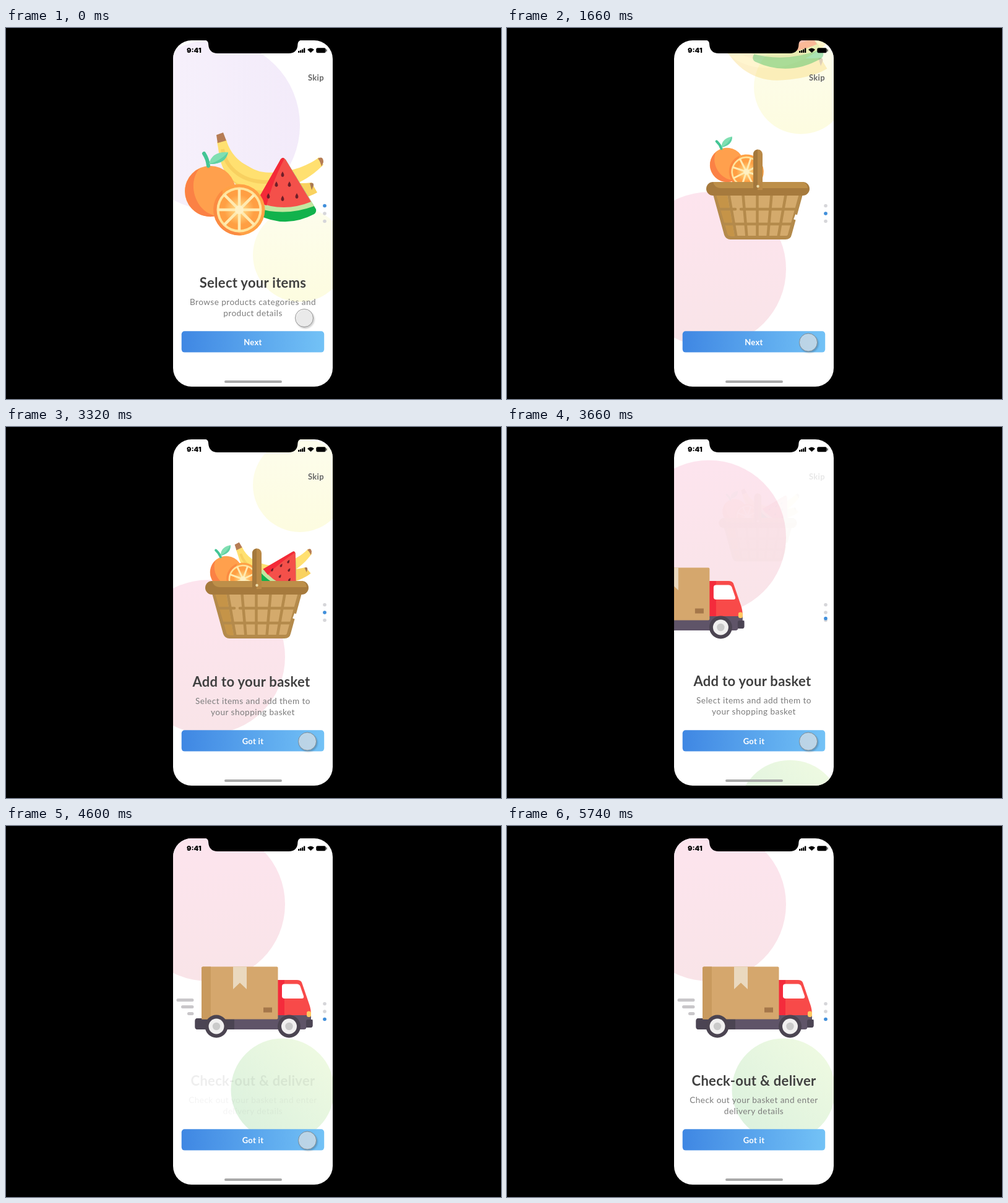
These frames come from a looping animation (800x600 px, 6.1 s). An HTML page:

```html
<!DOCTYPE html>
<html lang="en">
<head>
<meta charset="utf-8">
<title>Onboarding</title>
<style>
  html, body { margin: 0; width: 100%; height: 100%; overflow: hidden; background: #000; }
  svg { display: block; width: 800px; height: 600px; font-family: Lato, "Open Sans", sans-serif; }
  .copy { text-anchor: middle; }
  .title { font-weight: 700; font-size: 22px; letter-spacing: .3px; fill: #404040; }
  .sub { font-size: 13.6px; letter-spacing: .45px; fill: #7c7c7c; }
  .label { font-weight: 700; font-size: 13px; letter-spacing: .3px; }
  .time { font: 900 11px Inter, sans-serif; }
</style>
</head>
<body>
<svg viewBox="0 0 800 600">
  <defs>
    <clipPath id="screen"><rect x="270" y="20" width="258" height="560" rx="30"/></clipPath>
    <linearGradient id="blue"><stop stop-color="#3f87e3"/><stop offset="1" stop-color="#73c2f6"/></linearGradient>
    <linearGradient id="violet"><stop stop-color="#f7f2fc"/><stop offset="1" stop-color="#f3ebfa"/></linearGradient>
    <linearGradient id="lemon" x2="0" y2="1"><stop stop-color="#fdfdec"/><stop offset="1" stop-color="#fdfce0"/></linearGradient>
    <linearGradient id="rose" x2="0" y2="1"><stop stop-color="#fde4ee"/><stop offset="1" stop-color="#f9e4e8"/></linearGradient>
    <linearGradient id="mint" y1="1" y2="0"><stop stop-color="#d9f0dd"/><stop offset="1" stop-color="#f1fbe2"/></linearGradient>
    <radialGradient id="pulp"><stop offset=".1" stop-color="#ffdc86"/><stop offset=".75" stop-color="#ff9f43"/></radialGradient>
    <filter id="shade" x="-30%" y="-30%" width="170%" height="170%">
      <feDropShadow dx="1.5" dy="2" stdDeviation="1.2" flood-opacity=".3"/>
    </filter>
  </defs>

  <g clip-path="url(#screen)">
    <rect x="270" y="20" width="258" height="560" fill="#fff"/>
    <circle id="c1" r="138" fill="url(#violet)"/>
    <circle id="c2" r="76" fill="url(#lemon)"/>
    <circle id="c3" r="124.5" fill="url(#rose)"/>
    <circle id="c4" r="83.5" fill="url(#mint)"/>

    <g id="cart">
      <g id="banana">
        <path fill="#f9d25f" d="M350 200C352 245 390 285 440 281Q480 279 503 266L494 250Q460 254 420 240Z"/>
        <path fill="#a97a52" d="M491 251Q498 249 497 255L494 262Z"/>
        <path fill="#ffe070" d="M341 184C346 206 343 230 372 250C412 276 474 262 513 221L506 209C480 229 440 238 410 232C380 222 363 205 356 181Z"/>
        <path fill="none" stroke="#f8d060" stroke-width="6" d="M350 196C356 230 385 249 420 249Q445 249 470 242"/>
        <path fill="#b67d55" d="M340 173L351 169L356 182L342 186ZM504 211Q513 206 513 217L510 224Q508 216 504 211Z"/>
      </g>
      <g id="orange">
        <circle cx="330" cy="264" r="41" fill="#ffa04d"/>
        <path fill="#fb8145" d="M313 227A41 41 0 0 0 340 304C305 298 292 250 313 227Z"/>
        <path fill="none" stroke="#43c595" stroke-width="6" stroke-linecap="round" d="M320 203Q326 212 327 223"/>
        <path fill="#80dfb2" d="M328 220Q333 199 359 201Q355 221 328 220Z"/>
        <path fill="#5fd0a2" d="M328 220Q345 216 359 201Q355 221 328 220Z"/>
      </g>
      <g id="melon">
        <path fill="#12b24c" d="M443 214Q447 207 452 213L501 293Q502 298 498 301Q452 325 407 302Q402 299 404 294Z"/>
        <path fill="#c4e6a0" d="M443 214Q447 207 452 213L498 288Q450 306 401 290Z"/>
        <path fill="#f4504a" d="M443 214Q447 207 452 213L493 281Q449 299 405 281Z"/>
        <path fill="#f42a38" d="M443 214Q446 208 450 211Q430 250 421 287L405 281Z"/>
        <g id="seeds" fill="#6e1f28"></g>
      </g>
      <g id="half">
        <circle cx="377" cy="294" r="41.5" fill="#ffa145"/>
        <path fill="#fb8b42" d="M350 262A41.5 41.5 0 0 0 382 335Q345 318 350 262Z"/>
        <circle cx="377" cy="294" r="36.5" fill="#ffe39a"/>
        <circle cx="377" cy="294" r="32.5" fill="url(#pulp)"/>
        <path id="spokes" stroke="#ffeab0" stroke-width="4.5"/>
        <circle cx="377" cy="294" r="7" fill="#fff0c2"/>
      </g>
      <g id="basket">
        <path fill="#d4aa6c" stroke="#b48a4b" stroke-width="6" stroke-linejoin="round" d="M335 265H476L457 334Q456 339 450 339H361Q356 339 354 334Z"/>
        <path fill="#c59448" d="M338 270H356L368 337H362Q357 336 356 332Z"/>
        <path id="weave" fill="none" stroke="#b48a4b" stroke-width="4.5" stroke-linecap="round"/>
        <path stroke="#fff" stroke-width="4" d="M468 302L465 310"/>
        <rect x="322" y="249" width="167" height="22" rx="11" fill="#a67a3d"/>
        <path fill="#bd8f49" d="M333 249H478A11 11 0 0 1 486 259H345Q335 258 333 249Z"/>
        <path fill="#b98946" d="M398 262V204A7.5 7.5 0 0 1 413 204V262Z"/>
        <path fill="#a3783d" d="M398 262V204A7.5 7.5 0 0 1 405 196.500V262Z"/>
        <circle cx="405.500" cy="256" r="2.200" fill="#ecdca8"/>
      </g>
    </g>

    <path id="speed" stroke="#c9c7ca" stroke-width="5" stroke-linecap="round" d="M278 281.500H301M285.500 292.500H301M295.500 303.500H301"/>
    <g id="truck">
      <rect x="305.500" y="311" width="180" height="18" rx="4" fill="#5f5468"/>
      <path fill="#4b4453" d="M310 311H369V329H310Q305.500 329 305.500 325V315Q305.500 311 310 311Z"/>
      <path fill="#5f5468" d="M439 305H493V313H495.500V323Q495 326 491 326H439Z"/>
      <rect x="485" y="313" width="10.500" height="13" rx="3" fill="#4b4453"/>
      <path fill="#f84a49" d="M439 249H470Q476 249 478 253L490 288Q493 296 493 306H439Z"/>
      <path fill="#f42b3c" d="M439 249H450V306H439Z"/>
      <path fill="#fff" d="M450 255.500H470Q474 255.500 475.500 259L481 275Q482 279 478 279H450Q446 279 446 275V259.500Q446 255.500 450 255.500Z"/>
      <rect x="486" y="299.500" width="7" height="9.500" rx="3" fill="#ffca62"/>
      <rect x="316" y="227.500" width="123.500" height="85" rx="2" fill="#d5a76d"/>
      <path fill="#c99a5e" d="M318 227.500H331V312.500H316V229.500Z"/>
      <path fill="#ead9bf" d="M367 227.500H389V264L378 253.500L367 264Z"/>
      <rect x="416" y="293.500" width="14" height="8" fill="#a5774a"/>
      <g id="wheels"></g>
    </g>

    <g id="dots" fill="#d6d6da"></g>
    <circle id="dot" cx="515" r="2.800" fill="#3f8fdc"/>
    <g id="copies"></g>

    <rect x="283.700" y="490.200" width="230.500" height="34.400" rx="5" fill="url(#blue)"/>
    <g class="copy label" fill="#fff">
      <text id="next" x="399" y="512.500">Next</text>
      <text id="got" x="399" y="512.500">Got it</text>
    </g>
    <text id="skip" class="label" x="488" y="85" fill="#666">Skip</text>

    <text class="time" x="292" y="40">9:41</text>
    <path d="M472 37h2.300v3h-2.300zM475 36h2.300v4h-2.300zM478 34.500h2.300v5.500h-2.300zM481 32.500h2.300v7.500h-2.300z"/>
    <path d="M487 35Q492.500 30 498 35L492.500 40Z"/>
    <rect x="501.500" y="32.500" width="15" height="7.500" rx="2" stroke="#000" stroke-opacity=".5"/>
    <path d="M517.500 34.500h1v3.500h-1z"/>
    <rect x="353" y="570" width="93" height="4" rx="2" fill="#a9a9a9"/>
    <circle id="cursor" r="14.500" fill="#ececec" fill-opacity=".61" stroke="#777" stroke-opacity=".75" filter="url(#shade)"/>
    <path d="M321 19.500Q327 20 327 26Q328 41 342 41H457Q471 41 471.500 26Q472 20 478 19.500Z"/>
  </g>
</svg>

<script>
const LOOP = 6100;
const $ = id => document.getElementById(id);
const mix = (a, b, p) => a + (b - a) * p;
const span = (t, a, b) => Math.min(1, Math.max(0, (t - a) / (b - a)));
const sine = u => (1 - Math.cos(Math.PI * u)) / 2;
const swing = (t, a, b) => sine(span(t, a, b));

// cubic-bezier(.25, .1, .25, 1)
const curve = (m, p, q) => 3 * (1 - m) ** 2 * m * p + 3 * (1 - m) * m * m * q + m ** 3;
function ease(t, a, b) {
  const u = span(t, a, b);
  if (u === 0 || u === 1) return u;
  let lo = 0, hi = 1;
  for (let i = 0; i < 20; i++) {
    const m = (lo + hi) / 2;
    if (curve(m, .25, .25) < u) lo = m; else hi = m;
  }
  return curve(lo, .1, 1);
}

const fade = (id, o) => $(id).setAttribute("opacity", o);
function pose(id, [ox, oy], x, y, scale = 1, turn = 0, opacity = 1) {
  $(id).setAttribute("transform",
    `translate(${x} ${y}) rotate(${turn}) scale(${scale}) translate(${-ox} ${-oy})`);
  fade(id, opacity);
}
function place(id, x, y) {
  $(id).setAttribute("cx", x);
  $(id).setAttribute("cy", y);
}

// Repeated parts
$("seeds").innerHTML = [[447, 237], [437, 253], [458, 253], [424, 272], [447, 276], [470, 272]]
  .map(([x, y]) => `<path d="M${x} ${y - 5}q5 8 0 9q-5 -1 0 -9z"/>`).join("");
$("spokes").setAttribute("d", [0, 1, 2, 3].map(i => {
  const dx = 34 * Math.cos(i * Math.PI / 4), dy = 34 * Math.sin(i * Math.PI / 4);
  return `M${377 - dx} ${294 - dy}L${377 + dx} ${294 + dy}`;
}).join(""));
$("weave").setAttribute("d", "M344 293H369M378 293H468M350 317H462" +
  [-2, -1, 0, 1, 2].map(i => `M${404.5 + i * 23} 270L${404.5 + i * 17} 338`).join(""));
$("wheels").innerHTML = [340, 457.5].map(x =>
  [[18.5, "#4b4451"], [12.5, "#f1f0f0"], [6.2, "#cacaca"]]
    .map(([r, c]) => `<circle cx="${x}" cy="324" r="${r}" fill="${c}"/>`).join("")).join("");
$("dots").innerHTML = [0, 1, 2].map(i => `<circle cx="515" cy="${287.5 + i * 12.5}" r="2.8"/>`).join("");

const copies = [
  { text: ["Select your items", "Browse products categories and", "product details"], start: -2, end: -1, out: [780, 1200], rise: 73 },
  { text: ["Add to your basket", "Select items and add them to", "your shopping basket"], start: 2030, end: 2640, out: [3640, 4070], rise: 53 },
  { text: ["Check-out &amp; deliver", "Check out your basket and enter", "delivery details"], start: 4550, end: 5160, out: [LOOP, LOOP + 1], rise: 0 },
];
$("copies").innerHTML = copies.map(({ text: [title, a, b] }, i) =>
  `<g id="copy${i}" class="copy"><text class="title" x="${i === 1 ? 396.5 : 399}" y="419.500">${title}</text>
   <g class="sub"><text x="399" y="447.500">${a}</text><text x="399" y="465.500">${b}</text></g></g>`).join("");

// Each fruit lifts off by `lift`, then drops from above into the basket
const fruits = [
  { id: "banana", at: [430, 220], lift: [-8, -78], drop: [1580, 1920], from: [433, -15], to: [437, 213], size: [1.2, .7], turn: [0, -9] },
  { id: "orange", at: [330, 264], lift: [9, -85], drop: [1420, 1720], from: [350, 88], to: [356, 235], size: [1, .64], turn: [0, -16] },
  { id: "melon", at: [450, 262], lift: [1, -89], drop: [1560, 1960], from: [450, -34], to: [449.5, 234], size: [1.25, .7], turn: [-8, 30] },
  { id: "half", at: [377, 294], lift: [-7, -94], drop: [1420, 1720], from: [425, 99], to: [383, 246], size: [1, .64], turn: [0, 20] },
];

function drawFruit(t, { id, at, lift, drop, from, to, size, turn }) {
  if (t < 1400) {
    const p = swing(t, 780, 1400);
    pose(id, at, at[0] + lift[0] * p, at[1] + lift[1] * p, mix(1, .7, p), 0, 1 - span(t, 1080, 1380));
    return;
  }
  const u = span(t, ...drop), p = sine(u);
  pose(id, at, mix(from[0], to[0], p), mix(from[1], to[1], p),
    mix(...size, p), mix(...turn, p), Math.min(1, u * 1.4));
}

function draw(t) {
  const first = ease(t, 780, 1380), second = ease(t, 3320, 4020);

  place("c1", 337, 157 - 200 * first);
  fade("c1", 1 - span(t, 780, 1140));
  place("c2", 475, mix(367, 94, ease(t, 888, 1745)) - 190 * second);
  place("c3", 326.5, mix(726, 372, ease(t, 796, 1996)) - 245.5 * second);
  place("c4", mix(460, 447, ease(t, 3490, 4590)), mix(670, 427, ease(t, 3490, 4590)));

  fruits.forEach(f => drawFruit(t, f));
  const p = swing(t, 1060, 1420);
  pose("basket", [405, 270], 405, 270 + 125 * (1 - p), mix(.645, 1, p), 0, p);
  const away = swing(t, 3320, 3700);
  pose("cart", [405, 270], 405, 270 - 110 * away, 1 - .25 * away, 0, 1 - away);

  const rest = 1 - span(t, 3440, 4540);
  pose("truck", [0, 0], -275 * rest ** 4, 0);
  pose("speed", [0, 0], -12 * (1 - swing(t, 4040, 4540)) - swing(t, 4560, 4900) + swing(t, 5200, 5740), 0, 1, 0, swing(t, 4040, 4500));

  $("dot").setAttribute("cy", 287.5 + 12.5 * (swing(t, 780, 1280) + swing(t, 3320, 3820)));
  copies.forEach(({ start, end, out, rise }, i) => {
    const gone = swing(t, ...out);
    pose("copy" + i, [0, 0], 0, -rise * gone, 1, 0, span(t, start, end) * (1 - gone));
  });

  const swap = span(t, 2660, 3000);
  fade("next", 1 - swap);
  fade("got", swap);
  fade("skip", 1 - span(t, 3320, 3720));

  const move = swing(t, 10, 220), leave = span(t, 5060, 5260) ** 2;
  place("cursor", 482 + 5 * move + 57 * leave, 469 + 39.5 * move - 352 * leave);
  fade("cursor", t < 5280 ? 1 : 0);
}

function tick(now) {
  draw(now % LOOP);
  requestAnimationFrame(tick);
}
draw(0);
requestAnimationFrame(tick);
</script>
</body>
</html>
```
